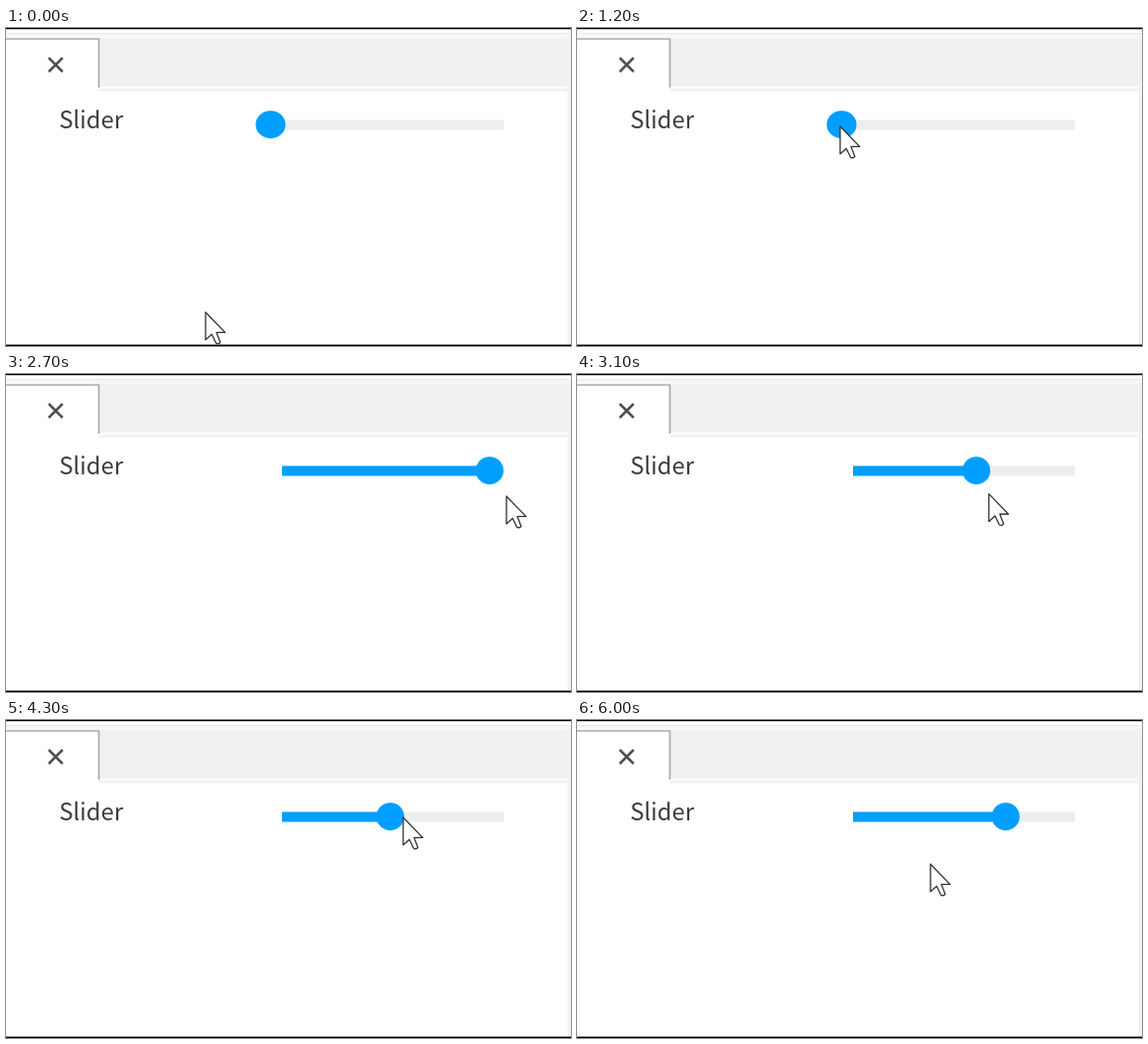
Write an HTML page that moves like this. It is 569 px wide and 320 px high and loops after 6100 ms.

```html
<!DOCTYPE html>
<html lang="en">
<head>
<meta charset="utf-8">
<title>Slider</title>
<style>
html, body { margin: 0; width: 100%; height: 100%; overflow: hidden; background: #fff; }
svg { display: block; width: 100%; height: 100%; }
text { font-family: "Noto Sans CJK JP", "Noto Sans CJK SC", "Noto Sans CJK", "Noto Sans", sans-serif; font-size: 23.7px; fill: #3c3c3c; }
.soft { filter: blur(.45px); }
</style>
</head>
<body>
<svg viewBox="0 0 569 320">
  <rect width="569" height="320" fill="#fff"/>
  <!-- window and tab bar -->
  <rect y="5" width="569" height="1.6" fill="#e9e9e9"/>
  <rect y="6.6" width="569" height="4" fill="#f8f8f8"/>
  <rect x="94" y="10" width="472" height="49" fill="#f1f1f1"/>
  <rect x="94" y="61" width="472" height="2.6" fill="#f2f2f2"/>
  <rect x="565.5" y="8" width="3.5" height="311" fill="#f2f2f2"/>
  <path d="M0 11H93.5V60" fill="none" stroke="#acacac" stroke-width="1.7"/>
  <rect width="569" height="1.2" fill="#000"/>
  <rect y="318.6" width="569" height="1.4" fill="#000"/>
  <g class="soft">
    <path d="M43 30L57 44M57 30L43 44" stroke="#505050" stroke-width="2.5"/>
    <text x="53.5" y="101">Slider</text>
    <!-- slider -->
    <rect x="278" y="92.5" width="223.5" height="10" fill="#ededed"/>
    <rect id="fill" x="278" y="92.5" height="10" fill="#009fff"/>
    <ellipse id="knob" cy="97.2" ry="14" fill="#009fff"/>
  </g>
  <path id="cursor" class="soft" d="M0 0V27.8L6.2 22.2L10.5 31Q12.4 32.8 14.8 30.2L11 20.4H19.7Z"
    fill="#fff" stroke="#333" stroke-width="1.3" stroke-linejoin="round"/>
</svg>
<script>
const LOOP = 6100, STEP = 100, REST = 266.5, TRACK = 278;

// Straight moves of cursor and knob; "sag" bows the cursor's path downwards.
const home = { x: 201, y: 286, knob: REST };
const moves = [
  { from: 0, to: 1200, x: 265, y: 99 },
  { from: 1300, to: 1900, x: 429, y: 114, knob: 406.5 },
  { from: 1900, to: 2100, x: 508, y: 123, knob: 487 },
  { from: 2100, to: 2500, x: 522 },
  { from: 2600, to: 2700, x: 504 },
  { from: 2700, to: 3700, x: 281, y: 117, knob: 275 },
  { from: 3800, to: 4300, x: 400, y: 98, knob: 387 },
  { from: 4300, to: 4800, x: 448, y: 101, knob: 431.7 },
  { from: 4900, to: 5600, x: 365, y: 145, sag: 37 },
  { from: 5600, to: 6000, x: 356 }
];

const [fill, knob, cursor] = ["fill", "knob", "cursor"].map(id => document.getElementById(id));

function pose(t) {
  const p = { ...home };
  for (const m of moves) {
    const u = Math.min(1, Math.max(0, (t - m.from) / (m.to - m.from)));
    for (const key in p) if (key in m) p[key] += (m[key] - p[key]) * u;
    p.y += (m.sag || 0) * Math.sin(Math.PI * u);
    if (u < 1) break;
  }
  return p;
}

function draw(now) {
  const t = Math.floor((now % LOOP) / STEP) * STEP;
  const p = pose(t);
  cursor.setAttribute("transform", `translate(${p.x} ${p.y})`);
  knob.setAttribute("cx", p.knob);
  knob.setAttribute("rx", p.knob === REST ? 15 : 14);
  fill.setAttribute("width", Math.max(0, p.knob - TRACK));
}

const start = performance.now();
function tick() {
  draw(performance.now() - start);
  requestAnimationFrame(tick);
}
tick();
</script>
</body>
</html>
```
